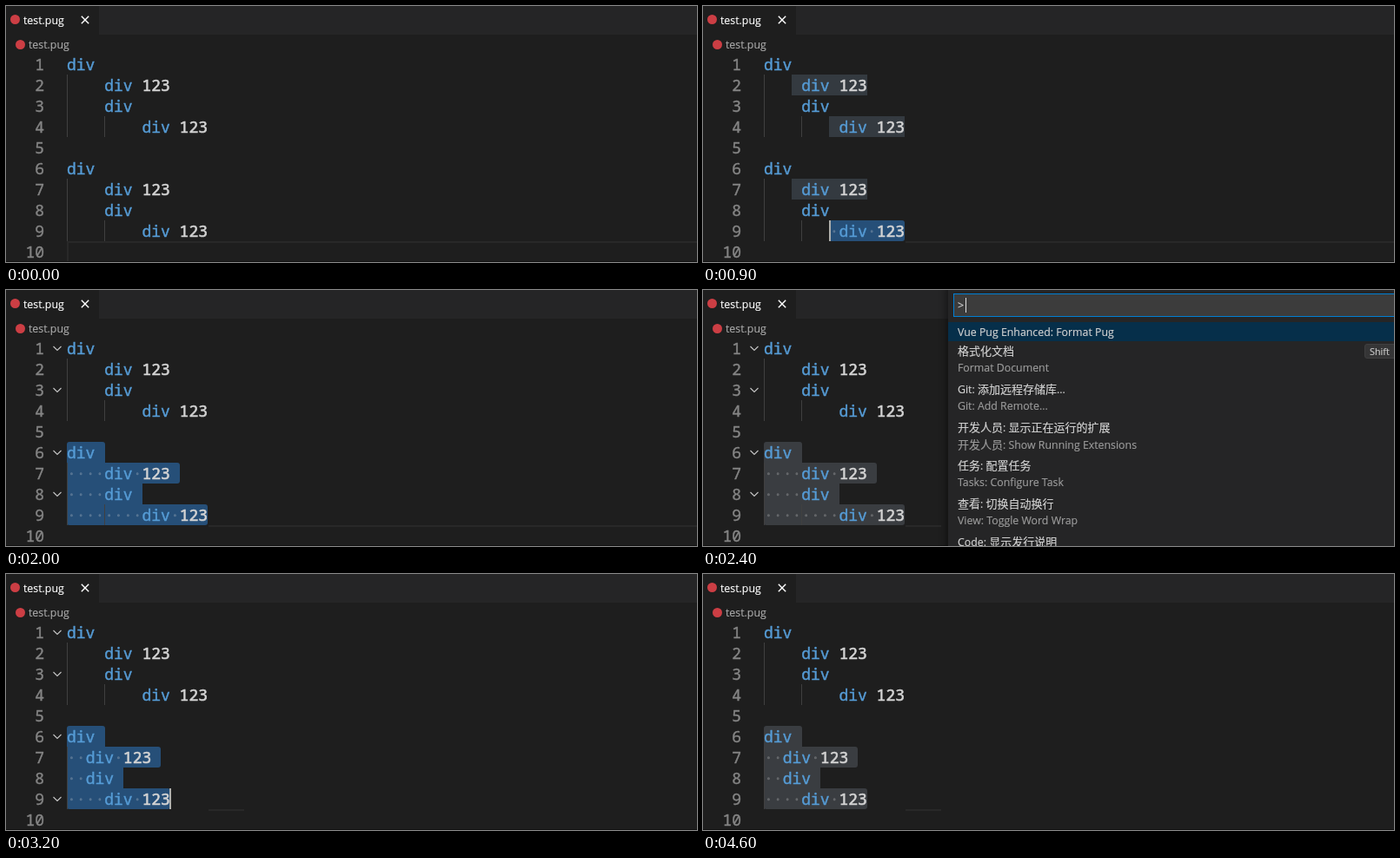
Write an HTML page that moves like this. It is 795 px wide and 295 px high and loops after 4.7 s.

```html
<!DOCTYPE html>
<html lang="zh-CN">
<head>
<meta charset="utf-8">
<title>Format selection</title>
<style>
html, body { margin: 0; width: 100%; height: 100%; overflow: hidden; background: #1e1e1e; }
#stage {
  position: relative; width: 795px; height: 295px; overflow: hidden;
  background: #1e1e1e; color: #d4d4d4;
  font: 12.35px/22px "Open Sans", "Noto Sans CJK SC", "Noto Sans CJK", sans-serif;
  -webkit-text-stroke: .15px;
}
#stage div, #stage svg { position: absolute; white-space: pre; }
.tabs { left: 107px; top: 0; width: 688px; height: 33px; background: #252526; }
.icon { width: 11px; height: 11px; border-radius: 50%; background: #cc3e44; }
.tab { left: 20px; top: 6px; color: #fff; }
.crumb { left: 26px; top: 34px; color: #a9a9a9; }
.num, .row { font: 18px/24px "Noto Sans Mono", monospace; height: 24px; -webkit-text-stroke: .4px; }
.num { left: 4px; width: 40px; text-align: right; color: #858585; }
.row { left: 70px; -webkit-text-stroke: .6px; }
.row b { color: #569cd6; font-weight: 400; -webkit-text-stroke: .4px; }
.row i { color: rgba(227, 228, 226, .22); font-style: normal; }
.sel, .match { height: 24px; }
.sel { background: #264f78; }
.blur .sel { background: #3a3d41; }
.match { background: rgba(173, 214, 255, .15); }
.guide { width: 1px; height: 24px; background: #404040; }
.caret { width: 2px; height: 24px; background: #aeafad; }
#current { left: 70px; top: 271px; width: 725px; height: 24px; border: solid #282828; border-width: 2px 0 0 2px; }
.edge { left: 0; top: 294px; width: 795px; height: 1px; background: #111; }
#folds { left: 0; top: 0; }
#palette {
  left: 282px; top: -4px; width: 600px; height: 320px; background: #252526;
  box-shadow: 0 0 8px 2px rgba(0, 0, 0, .45);
}
#palette .input { left: 6px; top: 8px; width: 560px; height: 25px; background: #3c3c3c; border: 1px solid #007fd4; }
#palette .picked { left: 0; top: 41px; width: 600px; height: 22px; background: #062f4a; }
#palette .item { left: 11px; color: #d4d4d4; }
#palette .sub { color: #9c9c9c; }
#palette .zh { font-size: 13px; }
#palette .key {
  left: 479px; top: 66px; width: 33px; height: 15px; padding-left: 5px;
  font-size: 10.8px; line-height: 15px; color: #ccc;
  background: #353536; border: 1px solid #3f3f40; border-radius: 3px;
}
#blink { left: 20px; top: 13px; width: 1px; height: 17px; background: #e0e0e0; }
</style>
</head>
<body>
<div id="stage">
  <div class="tabs"></div>
  <div class="icon" style="left:5px;top:10px"></div>
  <div class="tab">test.pug</div>
  <svg style="left:86px;top:11px" width="10" height="10" stroke="#fff" stroke-width="1.4"><path d="M.8 .8 9.2 9.2M9.2 .8 .8 9.2"/></svg>
  <div class="icon" style="left:11px;top:39px"></div>
  <div class="crumb">test.pug</div>
  <div id="current"></div>
  <div class="edge"></div>
  <div id="code"></div>
  <svg id="folds" width="70" height="295" fill="none" stroke="#c5c5c5" stroke-width="1.1"><path/></svg>
  <div id="palette"></div>
</div>
<script>
const LOOP = 4700, LEFT = 70, TOP = 55, CHAR = 10.8, LINE = 24, LAST = 9;
const $ = id => document.getElementById(id);
const x = col => Math.floor(LEFT + col * CHAR + .01);
const right = col => Math.ceil(LEFT + col * CHAR - .01);
const y = row => TOP + (row - 1) * LINE;

// Each step overrides part of the previous state; sel and caret are [row, col].
const steps = [
  [0, { sel: null, caret: null, fold: 0, nested: 8, tab: 4, blur: false, palette: false, blink: true, rule: [0, 0] }],
  [600, { caret: [9, 15], rule: [163, 0] }],
  [800, { sel: [9, 12], caret: [9, 12] }],
  [900, { sel: [9, 7], caret: [9, 7] }],
  [1000, { sel: [9, 0], caret: [9, 0], fold: .08 }],
  [1100, { sel: [8, 0], caret: [8, 0], fold: .35 }],
  [1200, { sel: [7, 0], caret: [7, 0], fold: .75 }],
  [1300, { fold: .88 }],
  [1400, { sel: [6, 0], caret: [6, 0], fold: .96 }],
  [1500, { fold: 1 }],
  [2000, { caret: null }],
  [2400, { palette: true, blur: true, rule: [163, 523] }],
  [2900, { blink: false }],
  [3200, { palette: false, blur: false, tab: 2, nested: 9, caret: [9, 11] }],
  [3400, { nested: 8 }],
  [3600, { caret: null }],
  [3900, { fold: .6 }],
  [4000, { fold: .25 }],
  [4100, { fold: .08, caret: [9, 11] }],
  [4200, { fold: 0 }],
  [4500, { blur: true }],
  [4600, { caret: null }]
];
let state = {};
const states = steps.map(([at, change]) => [at, state = { ...state, ...change }]);

const block = (cls, left, top, style = '', text = '') =>
  `<div class="${cls}" style="left:${left}px;top:${top}px;${style}">${text}</div>`;

function source(tab) {
  const tree = pad => ['div', pad + 'div 123', pad + 'div', pad + pad + 'div 123'];
  return [...tree('    '), '', ...tree(' '.repeat(tab)), ''];
}

function drawCode({ sel, caret, tab }) {
  const lines = source(tab);
  const inSel = row => sel && row >= sel[0] && row <= LAST;
  const from = row => row === sel[0] ? sel[1] : 0;
  const to = row => lines[row - 1].length + (row < LAST ? 1 : 0);
  const picked = sel && sel[0] === LAST ? lines[LAST - 1].slice(sel[1]) : null;
  let back = '', front = '';

  lines.forEach((line, i) => {
    const row = i + 1, top = y(row);
    if (inSel(row)) {
      const end = to(row), first = row === sel[0], last = row === LAST;
      const radius = [
        first, first || end > to(row - 1), last || end > to(row + 1), last
      ].map(on => on ? '3px' : '0').join(' ');
      const left = x(from(row));
      back += block('sel', left, top, `width:${right(end) - left}px;border-radius:${radius}`);
    } else if (picked && line.endsWith(picked)) {
      const left = x(line.length - picked.length);
      back += block('match', left, top, `width:${right(line.length) - left}px`);
    }
    const indent = line.search(/\S|$/);
    for (let col = 0; col < indent; col += 4) back += block('guide', x(col), top);

    const html = [...line]
      .map((c, col) => c === ' ' && inSel(row) && col >= from(row) ? '·' : c).join('')
      .replace('div', '<b>div</b>').replace(/·/g, '<i>·</i>');
    front += block('num', 4, top, '', row) + block('row', LEFT, top, '', html);
  });
  if (caret) front += block('caret', x(caret[1]), y(caret[0]));
  $('code').innerHTML = back + front;
}

function draw(s) {
  drawCode(s);
  $('code').className = s.blur ? 'blur' : '';
  $('current').style.clipPath = `inset(0 ${s.rule[1]}px 0 ${s.rule[0]}px)`;
  $('folds').style.opacity = s.fold;
  $('folds').firstElementChild.setAttribute('d',
    [1, 3, 6, s.nested].map(row => `M54.5 ${y(row) + 10}l4.5 4.5 4.5-4.5`).join(''));
  $('palette').style.display = s.palette ? '' : 'none';
  $('blink').style.display = s.blink ? '' : 'none';
}

function buildPalette() {
  const items = [
    ['格式化文档', 'Format Document'],
    ['Git: 添加远程存储库...', 'Git: Add Remote...'],
    ['开发人员: 显示正在运行的扩展', '开发人员: Show Running Extensions'],
    ['任务: 配置任务', 'Tasks: Configure Task'],
    ['查看: 切换自动换行', 'View: Toggle Word Wrap'],
    ['Code: 显示发行说明', '']
  ];
  const text = (cls, top, str) => block(cls, 11, top, '',
    str.replace(/[\u4e00-\u9fff]+/g, '<span class="zh">$&</span>'));
  $('palette').innerHTML =
    '<div class="input"></div><div class="picked"></div>' +
    text('item', 11, '&gt;') + '<div id="blink"></div>' +
    text('item', 42, 'Vue Pug Enhanced: Format Pug') +
    items.map(([title, sub], i) =>
      text('item', 63 + i * 44, title) + text('item sub', 83 + i * 44, sub)).join('') +
    '<div class="key">Shift</div>';
}

let shown;
function tick() {
  const t = performance.now() % LOOP;
  const now = states.filter(([at]) => at <= t).pop()[1];
  if (now !== shown) draw(shown = now);
  requestAnimationFrame(tick);
}
buildPalette();
tick();
</script>
</body>
</html>
```
